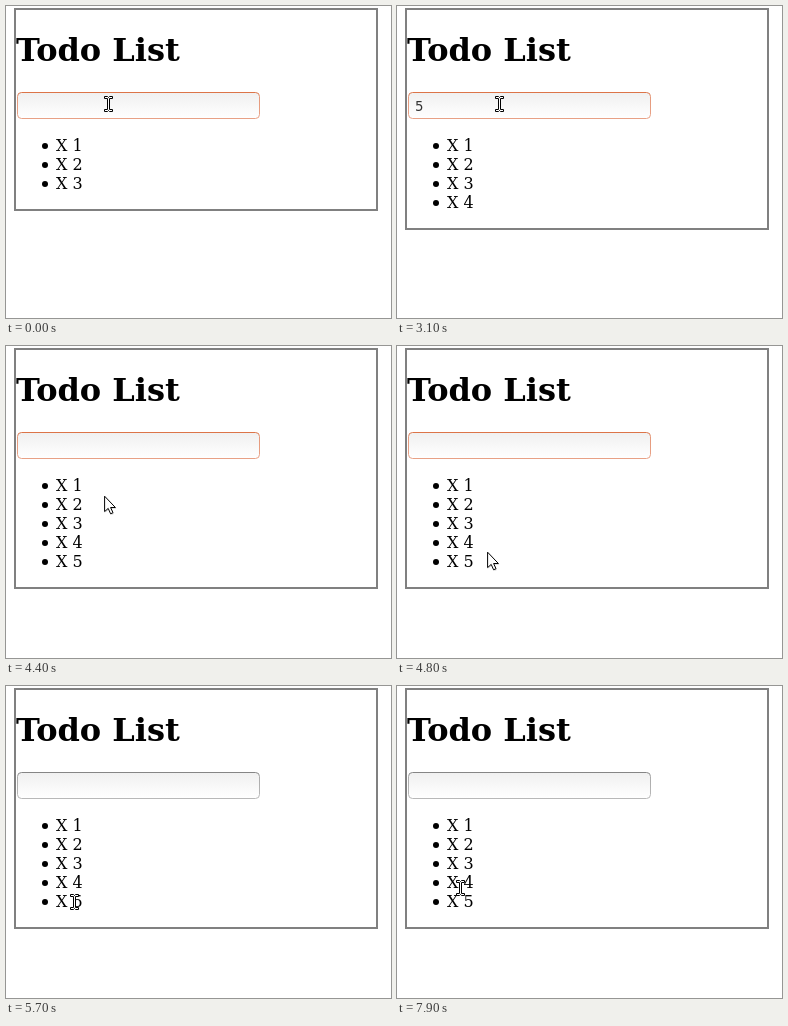
An HTML page for the animation above (8000 ms loop, 385 px wide and 312 px high).

```html
<!DOCTYPE html>
<html>
<head>
<meta charset="utf-8">
<title>Todo List</title>
<style>
html, body { margin: 0; width: 100%; height: 100%; overflow: hidden; background: #fff; }
svg { display: block; }
text { font: 16px "DejaVu Serif", serif; }
#title { font-size: 32px; font-weight: bold; }
#typed { font: 13.33px "DejaVu Sans", sans-serif; fill: #333; }
</style>
</head>
<body>
<svg width="385" height="312" viewBox="0 0 385 312">
  <defs>
    <linearGradient id="fill" x2="0" y2="1">
      <stop stop-color="#f0f0f0"/><stop offset="1" stop-color="#fff"/>
    </linearGradient>
    <linearGradient id="focused" x2="0" y2="1">
      <stop stop-color="#dc7448"/><stop offset=".2" stop-color="#e59a7c"/><stop offset="1" stop-color="#e8a186"/>
    </linearGradient>
    <linearGradient id="blurred" x2="0" y2="1">
      <stop stop-color="#858585"/><stop offset=".2" stop-color="#acacac"/><stop offset="1" stop-color="#b8b8b8"/>
    </linearGradient>
  </defs>
  <rect id="frame" x="9" y="3" width="362" fill="none" stroke="#808080" stroke-width="2"/>
  <text id="title" x="10" y="55">Todo List</text>
  <rect id="field" x="11.5" y="86.5" width="242" height="26" rx="4" fill="url(#fill)"/>
  <text id="typed" x="18" y="105"></text>
  <rect id="caret" y="91" width="1" height="17"/>
  <g id="list"></g>
  <path id="beam" d="M.5 .5H3.5L4.5 1.5L5.5 .5H8.5V2.5H5.5V13.5H8.5V15.5H5.5L4.5 14.5L3.5 15.5H.5V13.5H3.5V2.5H.5Z" fill="#fff" stroke="#000"/>
  <g id="arrow">
    <path d="M1.5 2V17.5L5 14.5L7.5 20L10 19L7.7 13.7H12.5Z" fill="#000" opacity=".15"/>
    <path d="M.6 1.2V16.6L4.2 13.4L6.6 18.8L9 17.7L6.6 12.5H11.4Z" fill="#fff" stroke="#000"/>
  </g>
</svg>
<script>
const LOOP = 8000;
const $ = id => document.getElementById(id);

// [start, item count, typed text, caret x (0 = hidden), focused]
const states = [
  [0, 3, "", 0, true], [700, 3, "", 18, true],
  [1600, 3, "4", 26, true], [1900, 3, "4", 0, true],
  [2300, 4, "", 18, true], [2900, 4, "5", 26, true], [3100, 4, "5", 0, true],
  [3400, 5, "", 18, true], [4300, 5, "", 0, true], [5300, 5, "", 0, false]
];

// [start, pointer shape, left, top]
const moves = [
  [0, "beam", 98, 90], [4000, "beam", 98, 95], [4100, "beam", 98, 99],
  [4200, "arrow", 99, 116], [4300, "arrow", 99, 131], [4400, "arrow", 98, 149],
  [4500, "arrow", 97, 167], [4600, "arrow", 95, 184], [4700, "arrow", 93, 197],
  [4800, "arrow", 90, 205], [4900, "arrow", 85, 206], [5100, "arrow", 85, 208],
  [5500, "arrow", 83, 210], [5600, "arrow", 77, 211], [5700, "beam", 64, 208],
  [6400, "beam", 60, 209], [6500, "beam", 53, 209], [6600, "arrow", 48, 213],
  [7000, "arrow", 48, 211], [7100, "beam", 48, 206], [7200, "beam", 49, 207],
  [7800, "beam", 54, 201], [7900, "beam", 59, 194]
];

const at = (list, t) => list.findLast(entry => entry[0] <= t);

for (let i = 0; i < 5; i++) {
  $("list").innerHTML += `<g><circle cx="39" cy="${140 + 19 * i}" r="3"/>
    <text x="50" y="${145 + 19 * i}">X ${i + 1}</text></g>`;
}

function draw(t) {
  const [, count, text, caretX, focused] = at(states, t);
  $("frame").setAttribute("height", 144 + 19 * count);
  [...$("list").children].forEach((item, i) => item.setAttribute("display", i < count ? "inline" : "none"));
  $("typed").textContent = text;
  $("caret").setAttribute("x", caretX);
  $("caret").setAttribute("display", caretX ? "inline" : "none");
  $("field").setAttribute("stroke", focused ? "url(#focused)" : "url(#blurred)");

  const [, shape, x, y] = at(moves, t);
  for (const id of ["beam", "arrow"]) $(id).setAttribute("display", id === shape ? "inline" : "none");
  $(shape).setAttribute("transform", `translate(${x} ${y})`);
}

const start = performance.now();
function tick() {
  draw((performance.now() - start) % LOOP);
  requestAnimationFrame(tick);
}
tick();
</script>
</body>
</html>
```
